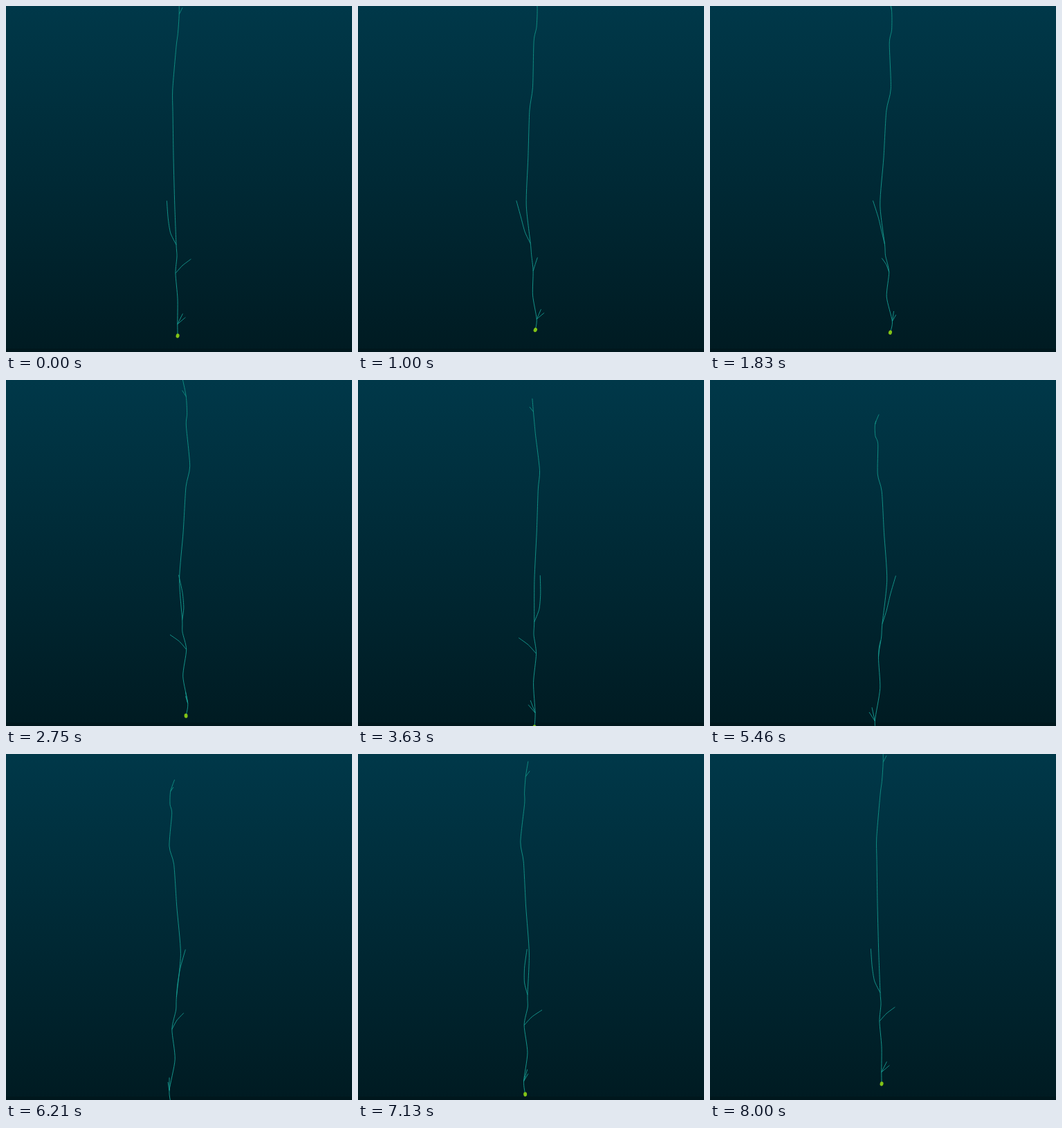
Animation of 500x500 px, one loop 8.04 s. Source, as an HTML page with a canvas:

```html
<!DOCTYPE html>
<html lang="en">
<head>
<meta charset="utf-8">
<title>Rotating neuron</title>
<style>
html, body { margin: 0; width: 100%; height: 100%; overflow: hidden; background: #002a36; }
canvas { display: block; width: 100vw; height: 100vh; }
</style>
</head>
<body>
<canvas id="stage" width="500" height="500"></canvas>
<script>
const ctx = document.getElementById('stage').getContext('2d');
const SIZE = 500, AXIS = 250, HORIZON = 235;
const LOOP = 8040, STEP = 1000 / 24, STEPS = 192;
const rad = degrees => degrees * Math.PI / 180;

// A point of the cell: height on the stage, distance from the axis, azimuth.
const at = (y, r, azimuth) => ({ y, r, azimuth: rad(azimuth) });

const soma = at(492, 11, 100);
const basalFork = at(473, 14, 99);
const rightNode = at(392, 10.7, 118);
const leftNode = at(348, 5, 143);
const topFork = at(33, 12.5, 89);

const stem = [
  soma, basalFork, at(432, 5.9, 110), rightNode, at(366, 5, 127), leftNode,
  at(288, 7.1, 209), at(220, 8.2, 166), at(156, 10.8, 146), at(127, 15.7, 126),
  at(72, 10.6, 112), at(56, 13, 97), topFork, at(11, 6.5, 90)
];
const branches = [
  [leftNode, at(330, 12.3, 180), at(308, 16.4, 196), at(282, 21.5, 215)],
  [rightNode, at(380, 6.4, 39), at(370, 17.8, -13)],
  [basalFork, at(462, 20, 62)],
  [basalFork, at(456, 16, 70)],
  [topFork, at(25, 10.3, 61)]
];

function gradient(from, to) {
  const fill = ctx.createLinearGradient(0, 0, 0, SIZE);
  fill.addColorStop(0, from);
  fill.addColorStop(1, to);
  return fill;
}
const sky = gradient('#003849', '#001b22');
const ink = gradient('#0f9284', '#17a096');

// Points sway up and down more the farther they lie from the horizon.
function place({ y, r, azimuth }, angle) {
  const reach = (y - HORIZON) / SIZE;
  const sway = (reach < 0 ? 200 : 91) * reach * reach;
  return [
    AXIS + r * Math.cos(angle - azimuth),
    y - sway * Math.cos(angle - rad(50))
  ];
}

function curve(points, angle) {
  const path = points.map(p => place(p, angle));
  const last = path.length - 1;
  const slope = i => {
    const p = path[Math.max(i - 1, 0)], q = path[Math.min(i + 1, last)];
    return [(q[0] - p[0]) * 0.12, (q[1] - p[1]) * 0.12];
  };
  ctx.beginPath();
  ctx.moveTo(...path[0]);
  for (let i = 0; i < last; i++) {
    const [x1, y1] = path[i], [x2, y2] = path[i + 1];
    const [dx1, dy1] = slope(i), [dx2, dy2] = slope(i + 1);
    ctx.bezierCurveTo(x1 + dx1, y1 + dy1, x2 - dx2, y2 - dy2, x2, y2);
  }
  ctx.stroke();
}

function drawSoma(angle) {
  const [x, y] = place(soma, angle);
  ctx.fillStyle = '#82c316';
  ctx.beginPath();
  ctx.ellipse(x, y, 2.5, 3.2, 0.2 + 0.25 * Math.sin(2 * angle), 0, Math.PI * 2);
  ctx.fill();
}

function draw(time) {
  const tick = Math.floor(time % LOOP / 10) * 10 + 9.99;
  const angle = Math.floor(tick / STEP) / STEPS * Math.PI * 2;

  ctx.fillStyle = sky;
  ctx.fillRect(0, 0, SIZE, SIZE);
  ctx.fillStyle = '#00171d';
  ctx.fillRect(0, 495, SIZE, 5);

  ctx.strokeStyle = ink;
  ctx.lineWidth = 0.9;
  [stem, ...branches].forEach(points => curve(points, angle));
  drawSoma(angle);
}

const start = performance.now();
function loop() {
  draw(performance.now() - start);
  requestAnimationFrame(loop);
}
loop();
</script>
</body>
</html>
```
